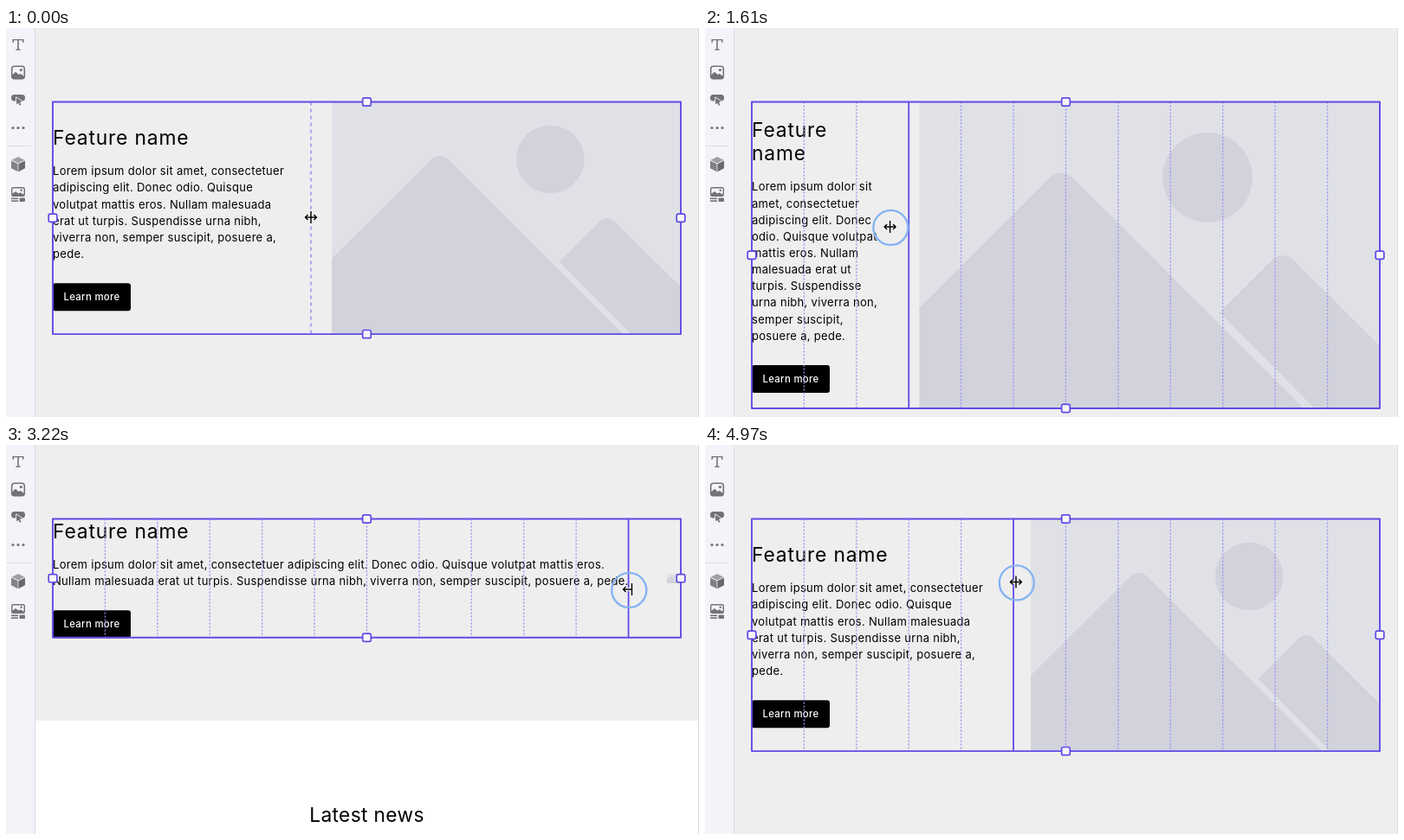
Recreate the animation shown at these times as an HTML page with a canvas. Size 800 by 450 pixels, loop 5040 ms.

```html
<!DOCTYPE html>
<html lang="en">
<head>
<meta charset="utf-8">
<title>Resizing columns</title>
<style>
html, body { margin: 0; width: 100%; height: 100%; overflow: hidden; background: #eee; }
canvas { display: block; width: 800px; height: 450px; }
</style>
</head>
<body>
<canvas id="stage" width="800" height="450"></canvas>
<script>
const ctx = document.getElementById('stage').getContext('2d');
const LOOP = 5040, STEP = 70, PRESS = 140;
const LEFT = 54, RIGHT = 779, TOP = 86, COL = (RIGHT - LEFT) / 12;
const PURPLE = '#5f4be6', ICON = '#737377', PANEL = '#f3f4fa';

// Pointer path: time, x, y
const PATH = [
  [0, 352, 219], [180, 352, 219], [800, 126, 219], [1350, 126, 219],
  [1610, 213.6, 230], [2450, 511, 181.5], [3020, 718.5, 167], [3440, 718.5, 167],
  [4200, 430.7, 149], [4600, 384, 153], [4860, 359, 158.5], [LOOP, 359, 158.5]
];

const LOREM = ('Lorem ipsum dolor sit amet, consectetuer adipiscing elit. Donec odio. Quisque ' +
  'volutpat mattis eros. Nullam malesuada erat ut turpis. Suspendisse urna nibh, viverra ' +
  'non, semper suscipit, posuere a, pede.').split(' ');

// Words per line for each column count from 3 up
const WRAPS = {
  3: [4, 2, 3, 3, 3, 3, 2, 4, 2, 3], 4: [5, 3, 4, 4, 4, 5, 4],
  5: [6, 5, 5, 6, 6, 1], 6: [7, 7, 7, 8], 7: [8, 8, 9, 4],
  8: [10, 9, 10], 9: [11, 11, 7], 10: [12, 12, 5], 11: [14, 15]
};

function bodyLines(k) {
  if (k === 1) return LOREM.flatMap(w => w.match(/.{1,2}/g).flatMap(p => /m/.test(p) ? [...p] : p));
  if (k === 2) {
    return ('Lorem|ipsum dolor|sit amet,|consectetu|er|adipiscing|elit. Donec|odio.|Quisque|' +
      'volutpat|mattis eros.|Nullam|malesuada|erat ut|turpis.|Suspendiss|e urna|nibh,|' +
      'viverra|non,|semper|suscipit,|posuere a,|pede.').split('|');
  }
  let i = 0;
  return WRAPS[k].map(n => LOREM.slice(i, i += n).join(' '));
}

function headLines(k) {
  if (k === 1) return [...'Featurename'];
  if (k === 2) return ['Featur', 'e', 'name'];
  return k === 3 ? ['Feature', 'name'] : ['Feature name'];
}

function pointer(t) {
  const i = PATH.findIndex(p => p[0] > t);
  const a = PATH[i - 1], b = PATH[i], f = (t - a[0]) / (b[0] - a[0]);
  return [a[1] + (b[1] - a[1]) * f, a[2] + (b[2] - a[2]) * f];
}

function rect(x, y, w, h, color) {
  ctx.fillStyle = color;
  ctx.fillRect(x, y, w, h);
}

function round(x, y, w, h, r, fill, stroke, width) {
  ctx.beginPath();
  ctx.roundRect(x, y, w, h, r);
  if (fill) { ctx.fillStyle = fill; ctx.fill(); }
  if (stroke) { ctx.strokeStyle = stroke; ctx.lineWidth = width; ctx.stroke(); }
}

function shape(path, color) {
  ctx.fillStyle = color;
  ctx.fill(new Path2D(path));
}

function disc(x, y, r, color) {
  ctx.beginPath();
  ctx.arc(x, y, r, 0, 7);
  ctx.fillStyle = color;
  ctx.fill();
}

function vline(x, y1, y2, width, color, dash = []) {
  ctx.beginPath();
  ctx.setLineDash(dash);
  ctx.moveTo(x, y1);
  ctx.lineTo(x, y2);
  ctx.strokeStyle = color;
  ctx.lineWidth = width;
  ctx.stroke();
  ctx.setLineDash([]);
}

function text(str, x, y, size, spacing, color = '#000', weight = 400, align = 'left') {
  ctx.font = `${weight} ${size}px Inter, sans-serif`;
  ctx.letterSpacing = spacing + 'px';
  ctx.textAlign = align;
  ctx.fillStyle = color;
  ctx.fillText(str, x, y);
}

function sidebar() {
  rect(0, 0, 33, 450, PANEL);
  rect(33, 0, 1, 450, '#dadbe2');
  shape('M7.5 13h13v4h-1.2l-.5-2.7h-4v10l2 .5v1h-5.6v-1l2-.5v-10h-4L8.7 17H7.5z', ICON);
  round(6.7, 44.2, 14.6, 14.6, 3, PANEL, ICON, 1.6);
  disc(17.4, 48.6, 1.6, ICON);
  shape('M7 54.5l4-3.8 3.8 3.4 1.8-1.4 4.4 3.3v1.5q0 1-1 1H8q-1 0-1-1z', ICON);
  round(6, 77, 16, 7.5, 3.5, ICON);
  ctx.lineJoin = 'round';
  const arrow = new Path2D('M11.8 80.5l7 4.6-2.8.8 1.6 3-1.7.9-1.6-3.1-2 1.9z');
  ctx.strokeStyle = PANEL;
  ctx.lineWidth = 1.6;
  ctx.stroke(arrow);
  ctx.fillStyle = ICON;
  ctx.fill(arrow);
  for (const x of [8, 14, 20]) disc(x, 115.5, 1.6, ICON);
  rect(0, 136, 28, 1, '#dcdde4');
  shape('M14 149l7.5 3.7L14 156.4l-7.5-3.7z', '#a0a0a4');
  shape('M6 153.5l7.6 3.8v9L6 162.3z', '#828286');
  shape('M22 153.5l-7.6 3.8v9l7.6-4z', '#69696d');
  round(6.7, 184.7, 14.6, 9.6, 1.6, PANEL, ICON, 1.4);
  shape('M7 192l4-3 3.4 2.4 1.8-1.2 4.8 2.6v1.2H7z', ICON);
  disc(17.7, 187.7, 1.2, ICON);
  rect(6, 196.5, 8, 1.6, ICON);
  rect(6, 199.3, 8, 1.6, ICON);
  round(15.5, 196.5, 6.5, 4.4, 1, ICON);
}

// Placeholder picture in units of its own width
function picture(x, y, w) {
  ctx.save();
  ctx.translate(x, y);
  ctx.scale(w, w);
  ctx.beginPath();
  ctx.rect(0, 0, 1, 2 / 3);
  ctx.clip();
  rect(0, 0, 1, 2 / 3, '#e0e1e7');
  const tone = '#d2d2dc';
  disc(.626, .1635, .0975, tone);
  shape('M0 .448L.28 .168Q.309 .139 .338 .168L.836 .6667H0z', tone);
  shape('M.652 .457L.763 .346Q.7895 .3195 .816 .346L1 .53V.6667H.859z', tone);
  ctx.restore();
}

function handle(x, y) {
  round(x - 4.8, y - 4.6, 9.6, 9.2, 1.8, '#f6f5fb', PURPLE, 1.7);
}

function cursor(x, y, k) {
  const bar = k === 1 ? -1 : k === 11 ? 4 : 0;
  const from = k === 1 ? -1 : k === 11 ? -6 : -6.5;
  const to = k === 1 ? 8.5 : k === 11 ? 4 : 6.5;
  let d = `M${bar} -7V7M${from} 0H${to}`;
  if (k > 1) d += `M${from + 3} -3L${from} 0L${from + 3} 3`;
  if (k < 11) d += `M${to - 3} -3L${to} 0L${to - 3} 3`;
  const p = new Path2D(d);
  ctx.save();
  ctx.translate(x, y);
  ctx.lineJoin = 'miter';
  for (const [color, width] of [['#fff', 3.4], ['#000', 1.5]]) {
    ctx.strokeStyle = color;
    ctx.lineWidth = width;
    ctx.stroke(p);
  }
  ctx.restore();
}

function draw(t) {
  const [px, py] = pointer(t);
  const pressed = t >= PRESS;
  // Text column is 64.4k - 48 wide, followed by a 48px gutter
  const k = Math.max(1, Math.min(11, Math.round((px - 30) / (COL + 4))));
  const split = LEFT + COL * k;
  const imgX = split + 4 * k, imgW = RIGHT - imgX, imgH = imgW * 2 / 3;
  const head = headLines(k), body = bodyLines(k);
  const textH = head.length * 27 + 16 + body.length * 19.14 + 24 + 32;
  const rowH = Math.max(textH, imgH), bottom = TOP + rowH;

  rect(0, 0, 800, 450, '#fff');
  rect(34, 0, 766, bottom + 95.5, '#eee');
  text('Latest news', 416.5, bottom + 212.5, 22.8, .3, '#000', 400, 'center');
  rect(799, 0, 1, 450, '#dcdcdf');
  sidebar();

  picture(imgX, TOP + (rowH - imgH) / 2, imgW);

  let y = TOP + (rowH - textH) / 2;
  for (const line of head) { text(line, LEFT, y + 21.5, 22.8, .85); y += 27; }
  y += 16;
  for (const line of body) { text(line, LEFT, y + 13.9, 13, .3); y += 19.14; }
  y += 24;
  round(LEFT, y, 90, 32, 3, '#000');
  text('Learn more', 66.5, y + 20.2, 11.4, .3, '#fff', 500);

  // Selection lines sit half a pixel above the content box
  const top = TOP - .5, low = bottom - .5;
  if (pressed) {
    for (let c = 1; c < 12; c++) {
      if (c !== k) vline(LEFT + COL * c, top, low, 1.3, '#9a8ff0', [2, 2]);
    }
    vline(split, top, low, 1.8, PURPLE);
  } else {
    vline(352, top, low, 1.4, '#9488f0', [4, 4]);
  }
  ctx.strokeStyle = PURPLE;
  ctx.lineWidth = 1.9;
  ctx.strokeRect(LEFT, top, RIGHT - LEFT, rowH);
  const mid = Math.min(top + rowH / 2, 369.5);
  handle(416.5, top);
  handle(416.5, low);
  handle(LEFT, mid);
  handle(RIGHT, mid);

  if (pressed) {
    ctx.beginPath();
    ctx.arc(px + .8, py + .9, 20, 0, 7);
    ctx.strokeStyle = '#86b3f2';
    ctx.lineWidth = 2.4;
    ctx.stroke();
  }
  cursor(px, py, k);
}

const start = performance.now();
function frame() {
  const t = Math.max(0, performance.now() - start) % LOOP;
  draw(Math.floor(t / STEP) * STEP);
  requestAnimationFrame(frame);
}
frame();
</script>
</body>
</html>
```
